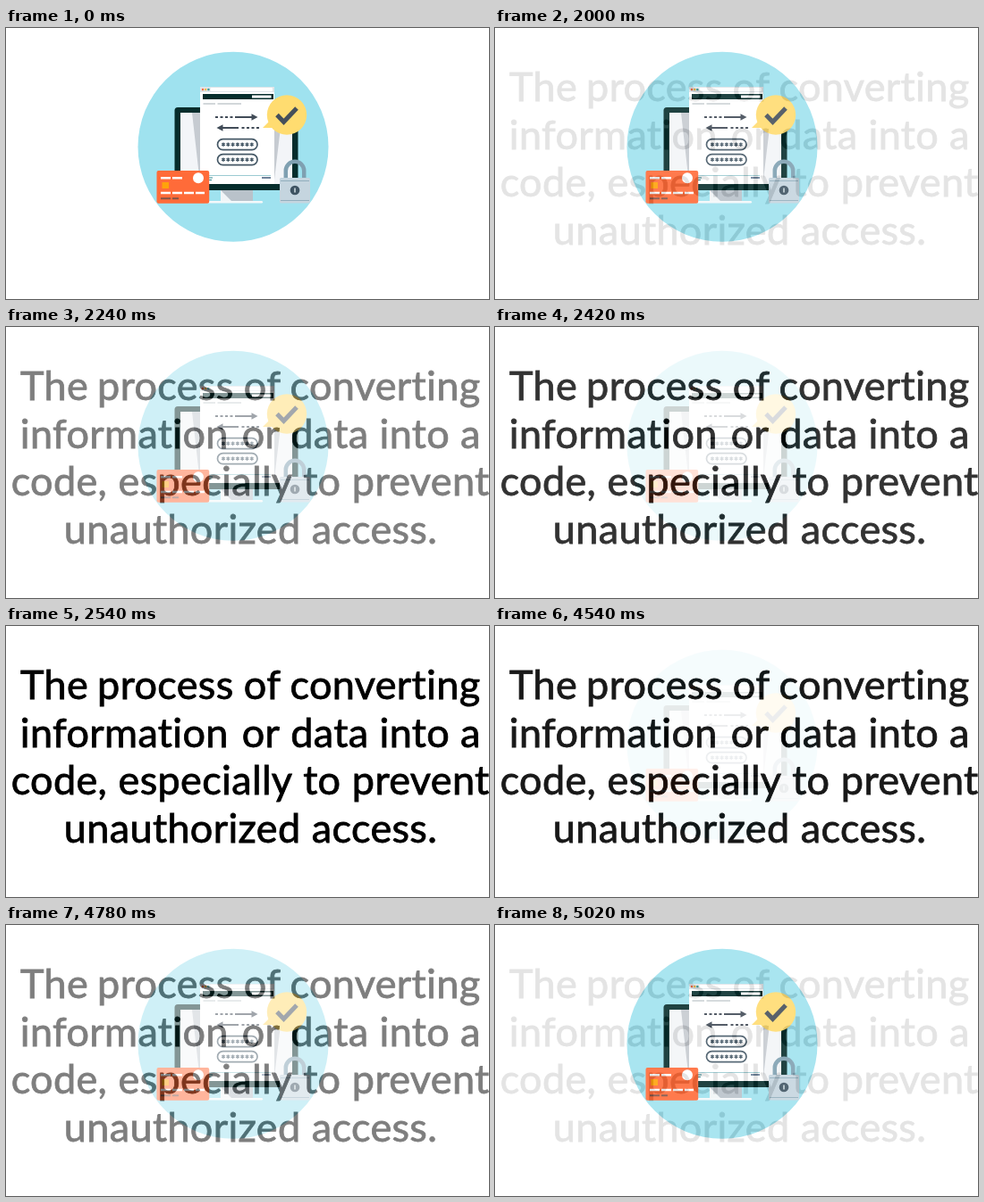
An HTML page for the animation above (5.08 s loop, 540 px wide and 304 px high).

```html
<!DOCTYPE html>
<html lang="en">
<head>
<meta charset="utf-8">
<title>Encryption flash card</title>
<style>
  html, body { margin: 0; width: 100%; height: 100%; overflow: hidden; background: #fff; }
  svg { display: block; width: 100%; height: 100%; }
  #words {
    font: 45px Lato, "Open Sans", sans-serif;
    font-variant-ligatures: none;
    letter-spacing: .35px;
    text-anchor: middle;
    stroke: #000;
    stroke-width: .8;
  }
</style>
</head>
<body>
<svg viewBox="0 0 540 304">
  <rect width="540" height="304" fill="#fff"/>
  <circle cx="254" cy="133.3" r="106.5" fill="#9fe2ef"/>

  <g id="monitor">
    <path d="M240 181H276V194H240Z" fill="#b9c2ca"/>
    <path d="M240 182L252 194H240Z" fill="#f1f5f7"/>
    <rect x="222" y="194" width="65" height="2.6" rx="1.3" fill="#f4f8fa"/>
    <rect x="188.5" y="89" width="138" height="93" rx="3.5" fill="#062d2c"/>
    <rect x="195" y="95" width="125" height="80" fill="#f3f5f8"/>
    <path d="M208 95H309L300 170V175H217Z" fill="#c6cbd1"/>
  </g>

  <g id="page">
    <rect x="217" y="66" width="83" height="109" fill="#fff"/>
    <rect x="217" y="66" width="83" height="6" fill="#dfe5e9"/>
    <rect x="228.5" y="67" width="69.5" height="4" rx="1" fill="#fff"/>
    <circle cx="220" cy="69" r="1.2" fill="#f26b45"/>
    <circle cx="223.2" cy="69" r="1.2" fill="#f4bd45"/>
    <circle cx="226.4" cy="69" r="1.2" fill="#3b9c97"/>
    <rect x="220" y="74" width="79" height="6" fill="#062d2c"/>
    <rect x="275" y="75.5" width="21.5" height="3" fill="#fff"/>
    <path d="M220.500 85H234M236.500 85H263" stroke="#c3cace" stroke-width="1.3"/>
    <g id="arrows" stroke="#414b57" stroke-width="2" fill="#414b57">
      <path d="M234 100H254" stroke-dasharray="3 2.500"/>
      <path d="M256 100H275"/>
      <path d="M274.500 96.300L281.500 100L274.500 103.700Z" stroke="none"/>
      <path d="M283 112H262" stroke-dasharray="3 2.500"/>
      <path d="M260 112H242"/>
      <path d="M242.500 108.300L235.500 112L242.500 115.700Z" stroke="none"/>
    </g>
    <g id="fields" fill="none" stroke="#455866"></g>
    <path d="M218 165.500H296" stroke="#9ccbd2" stroke-width="1"/>
    <path d="M286 168H296" stroke="#4b6483" stroke-width="1.6"/>
    <path d="M227 168H231M227 170.500H230" stroke="#2f8790" stroke-width="1.2"/>
  </g>

  <g id="bubble">
    <path d="M296 103L287 112L303 112Z" fill="#ffdc70"/>
    <circle cx="314" cy="97.5" r="22.2" fill="#ffdc70"/>
    <path d="M303 97.500L310.500 105.300L325 90" fill="none" stroke="#454f5a" stroke-width="5"/>
  </g>

  <g id="padlock">
    <path d="M312.800 169V160A10.200 10.200 0 0 1 333.200 160V169" fill="none" stroke="#7fa0b1" stroke-width="4.5"/>
    <rect x="306" y="168" width="34" height="28.5" rx="1.5" fill="#c5d5df"/>
    <path d="M307 171.500H339M307 193.500H339" stroke="#91aebd" stroke-width="1.2"/>
    <circle cx="323" cy="182" r="5.3" fill="#3e5362"/>
    <path d="M323 179.500V184.500" stroke="#dce8ed" stroke-width="1.4"/>
  </g>

  <g id="card" stroke-width="2.6">
    <rect x="168.5" y="160" width="58.7" height="36.7" rx="2" fill="#ff6b39"/>
    <circle cx="215" cy="168.3" r="6" fill="#fff"/>
    <path d="M173 168.300H184M186 168.300H197M173 185H184M186 185H197M199 185H210M212 185H222" stroke="#fff"/>
    <rect x="174.5" y="173" width="7.5" height="7" fill="#ffa20a"/>
    <path d="M173 191.300H184M186 191.300H193" stroke="#815448" stroke-width="2"/>
  </g>

  <!-- Opaque sheet, so its opacity gives a true cross-fade. -->
  <g id="sheet" opacity="0">
    <rect width="540" height="304" fill="#fff"/>
    <g id="words"></g>
  </g>
</svg>
<script>
  const LOOP = 5080, HOLD = 2000, FADE = 540, STEP = 60;
  const byId = id => document.getElementById(id);

  function add(parent, tag, attrs, text = "") {
    const node = document.createElementNS("http://www.w3.org/2000/svg", tag);
    for (const name in attrs) node.setAttribute(name, attrs[name]);
    node.textContent = text;
    parent.append(node);
  }

  // Each word is given with the x of its centre.
  const lines = [
    [82.3, { The: 54, process: 178.3, of: 286.6, converting: 424 }],
    [135.8, { information: 132.3, or: 285, data: 361.8, into: 456.8, a: 519.3 }],
    [189.3, { "code,": 59.4, especially: 223, to: 353.3, prevent: 463.7 }],
    [242.8, { unauthorized: 197.2, "access.": 412 }]
  ];
  for (const [y, words] of lines)
    for (const word in words) add(byId("words"), "text", { x: words[word], y }, word);

  for (const y of [130.7, 147.7]) {
    add(byId("fields"), "rect", { x: 236.5, y: y - 6, width: 44.5, height: 12, rx: 6, "stroke-width": 1.7 });
    for (let i = 0; i < 7; i++)
      add(byId("fields"), "path", {
        d: `M${243 + i * 5.3} ${y}m0 -2.2v4.4m-1.9 -3.3l3.8 2.2m0 -2.2l-3.8 2.2`,
        "stroke-width": 1.2
      });
  }

  function sheetOpacity(t) {
    const level = time => Math.min(Math.floor(time / STEP) + 1, 10) / 10;
    if (t < HOLD) return 0;
    if (t < HOLD * 2 + FADE) return level(t - HOLD);
    return 1 - level(t - HOLD * 2 - FADE);
  }

  function draw() {
    byId("sheet").setAttribute("opacity", sheetOpacity(performance.now() % LOOP));
    requestAnimationFrame(draw);
  }
  draw();
</script>
</body>
</html>
```
